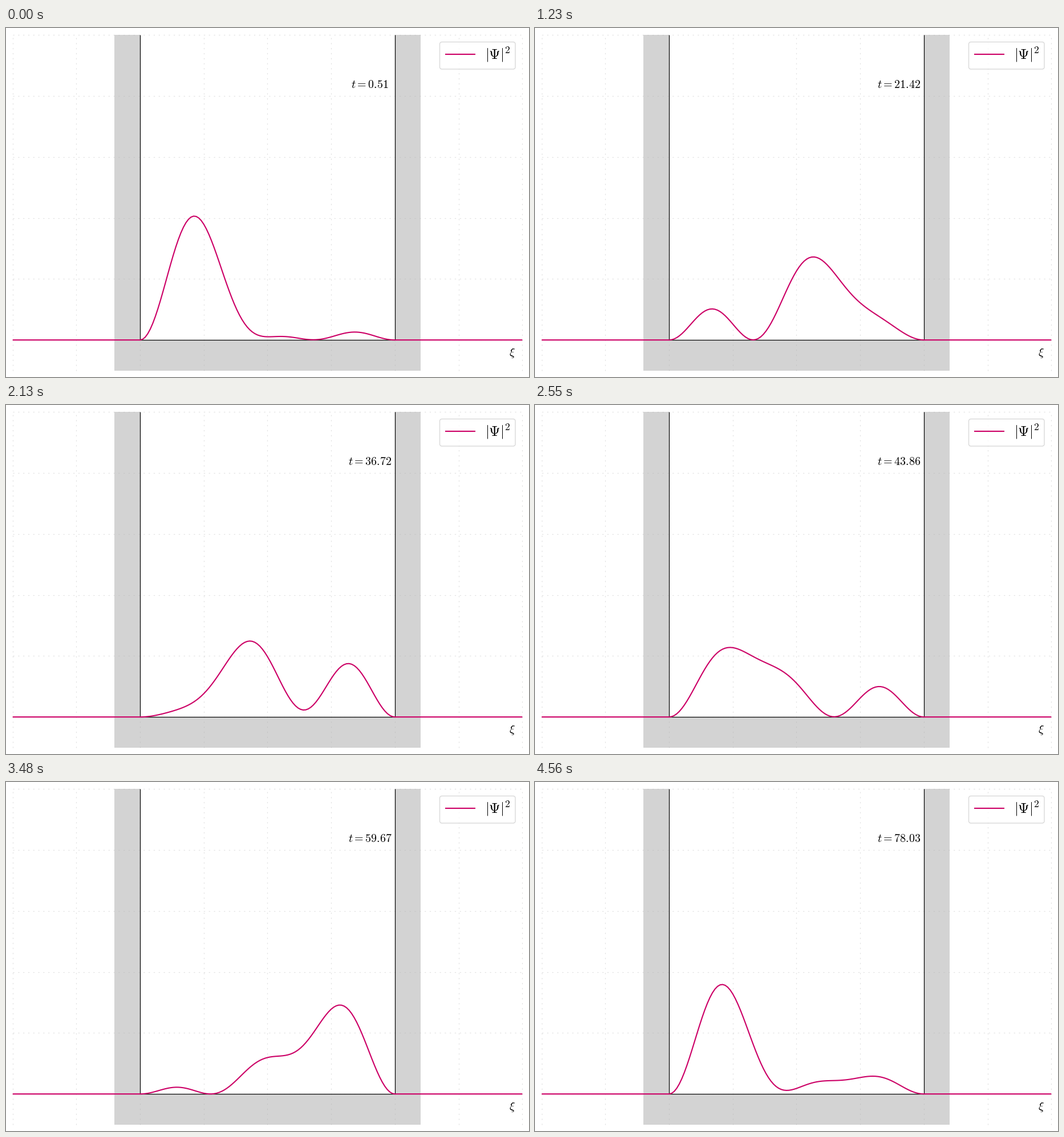
Write a matplotlib script that moves like this. It is 917x611 px and loops after 4590 ms.

```python
import numpy as np
import matplotlib.pyplot as plt
from matplotlib.animation import FuncAnimation
from matplotlib.patches import FancyBboxPatch, Rectangle

W, H, DPI = 917, 611, 64
PT = 72 / DPI                       # points per pixel
FRAMES, INTERVAL = 153, 30
PINK, GREY = "#cc0066", "#d3d3d3"

# Plot area and well, in pixels from the top left
X0, X1, TOP, BOTTOM = 11.7, 905.3, 12.0, 599.6
UNIT_X, UNIT_Y = (X1 - X0) / 8, 106.84
BASE = TOP + 5 * UNIT_Y
WALL_L, WALL_R = X0 + 2 * UNIT_X, X0 + 6 * UNIT_X
MEAN = UNIT_Y / 2                   # height of a uniform density

T_STEP = 0.51
PHASE_STEP = 0.02507                # ground state phase per frame

plt.rcParams["mathtext.fontset"] = "cm"
fig = plt.figure(figsize=(W / DPI, H / DPI), dpi=DPI, facecolor="white")
ax = fig.add_axes([0, 0, 1, 1])
ax.set_xlim(0, W)
ax.set_ylim(H, 0)
ax.axis("off")


def box(left, top, right, bottom):
    ax.add_patch(Rectangle((left, top), right - left, bottom - top,
                           fc=GREY, ec="none", zorder=1))


def stroke(xs, ys, color, width, z, **kw):
    return ax.plot(xs, ys, color=color, lw=width * PT, zorder=z, **kw)[0]


def label(x, y, s, size, ha):
    return ax.text(x, y, s, fontsize=size * PT, ha=ha, va="baseline",
                   color="black", zorder=6)


# Walls and floor of the well
pad = 0.4 * UNIT_X
box(WALL_L - pad, TOP, WALL_L, BOTTOM)
box(WALL_R, TOP, WALL_R + pad, BOTTOM)
box(WALL_L, BASE, WALL_R, BOTTOM)

grid = dict(ls=(0, (2, 6)), alpha=0.4, dash_capstyle="butt")
for i in range(9):
    x = X0 + i * UNIT_X
    stroke([x, x], [BOTTOM, TOP], "#b0b0b0", 1.1, 2, **grid)
for i in range(6):
    y = TOP + i * UNIT_Y
    stroke([X0, X1], [y, y], "#b0b0b0", 1.1, 2, **grid)

for x in (WALL_L, WALL_R):
    stroke([x, x], [TOP, BASE], "black", 1.2, 3, solid_capstyle="butt")
stroke([WALL_L, WALL_R], [BASE, BASE], "black", 1.2, 3)

# Legend
ax.add_patch(FancyBboxPatch((764.5, 28.5), 124.5, 39.5,
                            boxstyle="round,pad=0,rounding_size=4",
                            mutation_scale=1, fc="none", ec="none"))
ax.add_patch(FancyBboxPatch((760.5, 24.5), 132.5, 47.5,
                            boxstyle="round,pad=0,rounding_size=4",
                            fc="white", ec="#cccccc", alpha=0.8,
                            lw=1.3 * PT, zorder=4))
stroke([769.5, 823], [46, 46], PINK, 2.1, 5, solid_capstyle="butt")
label(839.5, 54.5, r"$|\Psi|^2$", 25, "left")

label(887.5, 574, r"$\xi$", 20, "center")
clock = label(638, 105, "", 20, "center")

u = np.linspace(0, 1, 101)
levels = np.array([1, 2, 3])
modes = np.sin(np.pi * np.outer(levels, u))
curve_x = np.concatenate(([X0], WALL_L + u * (WALL_R - WALL_L), [X1]))
curve = stroke([], [], PINK, 2.1, 5, solid_capstyle="butt")


def density(theta):
    """Equal mix of the three lowest states, relative to its mean."""
    psi = np.exp(-1j * levels ** 2 * theta) @ modes
    return 2 / 3 * np.abs(psi) ** 2


def update(i):
    rho = density(PHASE_STEP * (i + 2))
    curve.set_data(curve_x, BASE - MEAN * np.concatenate(([0], rho, [0])))
    clock.set_text(f"$t = {T_STEP * (i + 1):.2f}$")
    return curve, clock


anim = FuncAnimation(fig, update, frames=FRAMES, interval=INTERVAL,
                     repeat=True, repeat_delay=0)
plt.show()
```
